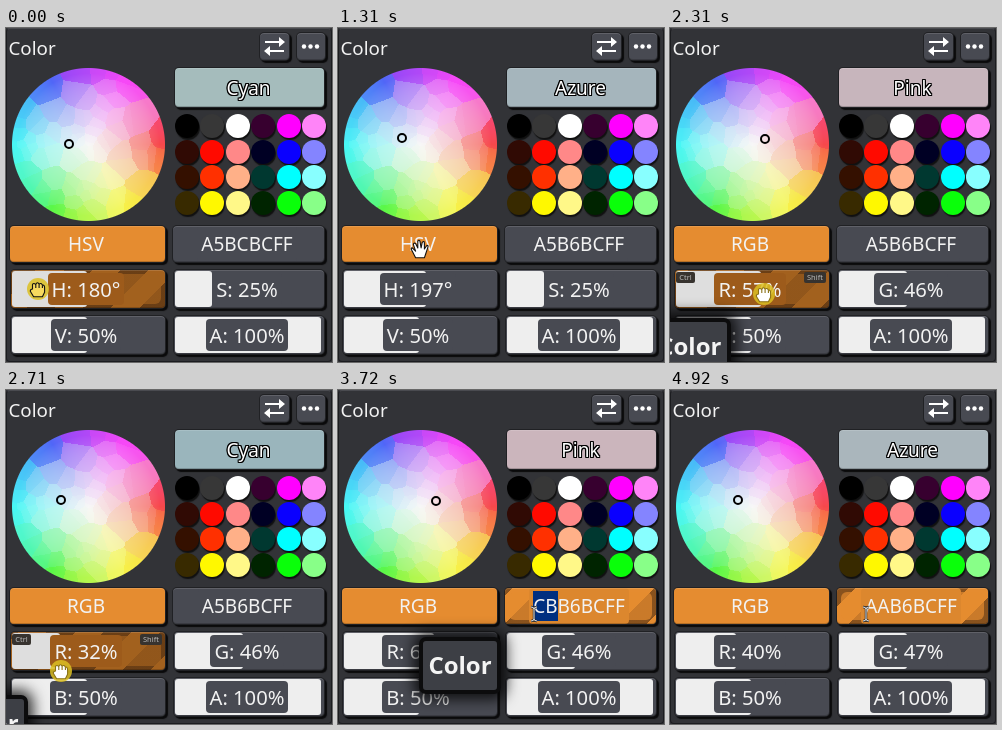
Recreate the animation shown at these times as an HTML page with a canvas. Size 326 by 334 pixels, loop 5020 ms.

```html
<!DOCTYPE html>
<html lang="en">
<head>
<meta charset="utf-8">
<title>Color panel</title>
<style>
html, body { margin: 0; width: 100%; height: 100%; overflow: hidden; background: #323337; }
#stage { position: relative; width: 326px; height: 334px; overflow: hidden; background: #323337;
  color: #f2f2f2; font: 20.2px "Noto Sans", "Open Sans", sans-serif; user-select: none; }
#stage > * { position: absolute; box-sizing: border-box; }
#edge { inset: 0; border: 1px solid #1b1c1f; border-top-color: #4a4b50; border-radius: 4px; }
#title { left: 2.5px; top: 5px; font-size: 18.8px; line-height: 30px; }
#wheel { left: 5px; top: 39px; }
#ring { width: 10px; height: 10px; margin: -5px; border: 2px solid #000; border-radius: 50%; }
.box { overflow: hidden; border-radius: 4px; background: #484a52; text-align: center; white-space: pre;
  box-shadow: 0 0 0 1px #202124, 2px 2px 1px 1px #0a0a0b; }
.box::after { content: ""; position: absolute; inset: 0; border-radius: 4px;
  box-shadow: inset 0 1px 0 rgba(255,255,255,.13), inset 0 -1px 0 rgba(0,0,0,.2); }
.field { font-size: 19px; font-weight: 300; }
.field .val { left: -1.5px; }
#mode { padding-right: 3px; }
.orange { background: #e58c30; }
.fill { position: absolute; left: 1px; top: 1px; bottom: 1px; border-radius: 3px; background: #eee; }
.stripes { position: absolute; inset: 0 -60px; display: none;
  background: repeating-linear-gradient(135deg, rgba(60,34,14,.55) 0 20px, transparent 20px 40px); }
.inner { position: absolute; inset: 4px; border-radius: 6px; display: none; opacity: .7; background: inherit; }
.hover { background: #e58c30; }
.hover .stripes, .hover .inner { display: block; }
.hover .fill { background: #d8d8d8; }
.val { position: relative; display: inline-block; padding: 0 4px; border-radius: 4px; background: #484a52; }
.slider .val { left: -2px; line-height: 32px; margin-top: 3px; }
.hover .val { background: #dc872e; }
.press { background: #a3611e; }
.press .fill { background: #dedede; }
.press .val { background: #9d5b1b; }
.sel { background: #002f80; display: inline-block; line-height: 30px; }
#swatch { left: 169px; top: 40px; width: 149px; height: 39px; line-height: 40px; padding-right: 2px;
  font-size: 19px; font-weight: 500; color: #fff;
  text-shadow: 1px 0 #000, -1px 0 #000, 0 1px #000, 0 -1px #000, 1px 1px #000, -1px 1px #000, 1px -1px #000, -1px -1px #000; }
.dot { width: 24px; height: 24px; border-radius: 50%; box-shadow: 1px 2px 1px #111; }
.key { height: 11px; border-radius: 2px; background: #37332f; color: #bbb; font-size: 7.5px; line-height: 11px; text-align: center; }
#tip { width: 82px; height: 57px; line-height: 48px; border: 4px solid #0c0c0d; border-radius: 7px; background: #3d3f45;
  color: #f4f4f4; font-size: 24px; font-weight: 600; text-align: center; box-shadow: 0 0 14px 5px rgba(0,0,0,.8); }
svg { overflow: visible; }
</style>
</head>
<body>
<div id="stage">
  <div id="edge"></div>
  <div id="title">Color</div>
  <div class="box" style="left:254px;top:5px;width:29px;height:27px"></div>
  <div class="box" style="left:291px;top:5px;width:28px;height:27px"></div>
  <svg width="326" height="40" fill="#fff">
    <path d="M259 13h14v-4l6 5-6 5v-4h-14zM278 22h-14v-4l-6 5 6 5v-4h14z"/>
    <circle cx="298" cy="18.500" r="2.200"/><circle cx="304.500" cy="18.500" r="2.200"/><circle cx="311" cy="18.500" r="2.200"/>
  </svg>
  <canvas id="wheel" width="155" height="155"></canvas>
  <div id="ring"></div>
  <div id="swatch" class="box"></div>
  <div id="mode" class="box field orange" style="left:4px;top:198px;width:155px;height:36px;line-height:36px"></div>
  <div id="hex" class="box field" style="left:167px;top:198px;width:151px;height:36px;line-height:36px"><div class="stripes"></div><div class="inner"></div><span class="val"></span></div>
  <div id="ctrl" class="key" style="left:6px;top:244px;width:19px">Ctrl</div>
  <div id="shift" class="key" style="left:134px;top:244px;width:22px">Shift</div>
  <div id="tip">Color</div>
  <svg id="hand" width="1" height="1">
    <circle id="glow" r="11" fill="#dcc022" fill-opacity=".85"/>
    <path id="palm" stroke="#111" stroke-linejoin="round" transform="scale(1.1)"/>
  </svg>
  <svg id="beam" width="1" height="1" fill="none">
    <path d="M-3-7q3 0 3 2V5q0 2-3 2M3-7q-3 0-3 2M0 5q0 2 3 2" stroke="#222" stroke-width="2.400"/>
    <path d="M-3-7q3 0 3 2V5q0 2-3 2M3-7q-3 0-3 2M0 5q0 2 3 2" stroke="#eee"/>
  </svg>
</div>
<script>
const $ = id => document.getElementById(id);
const stage = $('stage');
const LOOP = 5020, STEP = 100.4, LAST = 49;

const toByte = v => Math.round(255 * (v <= .0031308 ? v * 12.92 : 1.055 * v ** (1 / 2.4) - .055));
const toLinear = b => ((b / 255 + .055) / 1.055) ** 2.4;
const css = c => `rgb(${c.map(toByte)})`;
const percent = v => Math.round(v * 100) + '%';

function hsv(h, s, v) {
  return [5, 3, 1].map(n => {
    const k = (n + h / 60) % 6;
    return v - v * s * Math.max(0, Math.min(k, 4 - k, 1));
  });
}

function hueSat([r, g, b]) {
  const max = Math.max(r, g, b), d = max - Math.min(r, g, b);
  const h = !d ? 0 : max === r ? (g - b) / d : max === g ? 2 + (b - r) / d : 4 + (r - g) / d;
  return [(h * 60 + 360) % 360, d / max];
}

const NAMES = ['Red', 'Orange', 'Yellow', 'Lime', 'Green', 'Spring', 'Cyan', 'Azure', 'Blue', 'Violet', 'Magenta', 'Pink'];
const hueName = h => NAMES[Math.floor((h + 15) / 30) % 12];

// Faceted hue wheel: small cells near the middle, large ones at the rim
function drawWheel() {
  const ctx = $('wheel').getContext('2d'), size = 155, c = 77.5, R = 76.5;
  const img = ctx.createImageData(size, size);
  let seed = 11;
  const rnd = () => (seed = seed * 16807 % 2147483647) / 2147483647;
  const at = (x, y) => hsv((Math.atan2(y, x) * 180 / Math.PI + 360) % 360, Math.min(Math.hypot(x, y) / R, .93), .93).map(toByte);
  const cells = Array.from({ length: 90 }, () => {
    const r = R * rnd() ** .7, a = rnd() * 2 * Math.PI;
    const x = r * Math.cos(a), y = r * Math.sin(a);
    return { x, y, rgb: at(x, y) };
  });
  for (let j = 0; j < size; j++) for (let i = 0; i < size; i++) {
    const x = i + .5 - c, y = j + .5 - c, r = Math.hypot(x, y);
    if (r > R + .5) continue;
    let best = 1e9, cell;
    for (const p of cells) {
      const d = (p.x - x) ** 2 + (p.y - y) ** 2;
      if (d < best) { best = d; cell = p; }
    }
    const base = at(x, y), o = (j * size + i) * 4;
    for (let k = 0; k < 3; k++) img.data[o + k] = base[k] * .4 + cell.rgb[k] * .6;
    img.data[o + 3] = 255 * Math.min(1, R + .5 - r);
  }
  ctx.putImageData(img, 0, 0);
}

const PALETTE = [
  '#000 #373737 #fff #37002f #f0f #ff84f8',
  '#300a04 #ff0a00 #ff8888 #000024 #0a00ff #8484ff',
  '#341000 #ff3000 #ffb088 #003830 #0ff #88ffff',
  '#382a00 #fff800 #fff888 #002400 #0aff0a #88ff88'
];

function addDots() {
  PALETTE.forEach((row, j) => row.split(' ').forEach((color, i) => {
    const d = document.createElement('div');
    d.className = 'dot';
    d.style.cssText = `left:${168.5 + i * 25.5}px;top:${86 + j * 25.5}px;background:${color}`;
    stage.insertBefore(d, $('mode'));
  }));
}

function addSlider(x, y, w) {
  const el = document.createElement('div');
  el.className = 'box slider';
  el.style.cssText = `left:${x}px;top:${y}px;width:${w}px;height:38px`;
  el.innerHTML = '<div class="stripes"></div><div class="inner"></div><div class="fill"></div><span class="val"></span>';
  stage.insertBefore(el, $('ctrl'));
  return (label, v, text) => {
    el.querySelector('.fill').style.width = v * (w - 4) + 'px';
    el.querySelector('.val').textContent = label + ': ' + (text || percent(v));
    return el;
  };
}

// step, x, y of the pointer
const PATH = [
  [0, 32, 262], [7, 62.5, 276], [10, 90.5, 271], [13, 82, 222], [14, 82, 222],
  [18, 119, 256], [20, 119, 258], [27, 55, 282], [32, 119.5, 276], [34, 98.3, 268],
  [36, 196, 224], [50, 196, 224]
];

function pointer(n) {
  const i = PATH.findIndex((p, k) => n < PATH[k + 1][0]);
  const [a, x0, y0] = PATH[i], [b, x1, y1] = PATH[i + 1];
  const u = (n - a) / (b - a), e = u * u * (3 - 2 * u);
  return [x0 + (x1 - x0) * e, y0 + (y1 - y0) * e];
}

const OPEN = 'M-4 8 L-7 2 Q-9-1-7-1 L-4 2 L-6-4 Q-6-6-4-5 L-2-1 L-2-7 Q-1-9 0-7 L1-1 L2-6 Q4-8 4-5 L4 0 L6-3 Q8-4 7-1 L5 5 L4 8Z';
const FIST = 'M-4 7 L-7 2 Q-7 0-5 0 L-5-4 Q-4-6-2-4 Q-1-7 1-4.500 Q3-6 4-3.500 Q6-4 6-1 L6 3 L4 7Z M-2-4 V-1 M1-4.500 V-1 M4-3.500 V-1';

const place = (el, x, y) => { el.style.left = x + 'px'; el.style.top = y + 'px'; };
const show = (el, on) => { el.style.visibility = on ? 'visible' : 'hidden'; };

drawWheel();
addDots();
const s1 = addSlider(5, 242, 154), s2 = addSlider(168, 242, 150);
const s3 = addSlider(5, 288, 154), s4 = addSlider(168, 288, 150);
const stripes = document.querySelectorAll('.stripes');

function render(n) {
  const [x, y] = pointer(n), frac = (x - 4.5) / 157;
  const dragHue = n >= 1 && n <= 10, dragRed = n >= 20 && n <= 34;
  const press = n <= 10 || dragRed;
  const isHsv = n < 14;
  const hue = n < 1 ? 180 : dragHue ? frac * 360 : 197.3;

  let rgb = hsv(hue, .25, .5);
  if (dragRed) rgb[0] = frac;
  else if (n > 34) rgb[0] = toLinear(0xCB);
  if (n >= 44) rgb = [0xAA, 0xB6, 0xBC].map(toLinear);
  const [h, s] = hueSat(rgb);

  const a = h * Math.PI / 180;
  place($('ring'), 82 + 76 * s * Math.cos(a), 115.8 + 76 * s * Math.sin(a));
  $('swatch').style.backgroundColor = css(rgb);
  $('swatch').textContent = hueName(h);
  $('mode').textContent = isHsv ? 'HSV' : 'RGB';

  const first = isHsv ? s1('H', hue / 360, Math.round(hue) + '°') : s1('R', rgb[0]);
  if (isHsv) { s2('S', .25); s3('V', .5); }
  else { s2('G', rgb[1]); s3('B', rgb[2]); }
  s4('A', 1);

  const overFirst = n <= 10 || (n >= 17 && n <= 34), overHex = n >= 36;
  first.classList.toggle('hover', overFirst);
  first.classList.toggle('press', press);
  $('hex').classList.toggle('hover', overHex);
  stripes.forEach(el => el.style.transform = `translateX(${(n * 5.65) % 56.57}px)`);

  const typed = n < 41 ? 'CB' : n < 42 ? '' : n < 43 ? 'A' : 'AA';
  const head = n <= 10 ? 'A5BC' : n <= 34 ? 'A5B6' : typed + 'B6';
  const val = $('hex').querySelector('.val');
  const text = head + 'BCFF';
  if (n >= 37 && n < 41) val.innerHTML = `<span class="sel">${text.slice(0, 2)}</span>${text.slice(2)}`;
  else val.textContent = text;

  const keys = press && n > 0 && n !== 20;
  show($('ctrl'), keys);
  show($('shift'), keys);
  show($('tip'), n >= 23 && n <= 40);
  place($('tip'), x - 115, y + 23);

  show($('hand'), !overHex);
  show($('beam'), overHex);
  place($('hand'), x, y - 1);
  place($('beam'), x, y);
  $('glow').style.display = press ? '' : 'none';
  $('palm').setAttribute('d', press ? FIST : OPEN);
  $('palm').setAttribute('fill', n === 0 ? '#f7d95e' : '#fff');
  $('palm').setAttribute('stroke', press && n > 0 ? '#8a7216' : '#111');
}

let shown = -1;
const start = performance.now();
function tick() {
  const t = (performance.now() - start) % LOOP;
  const n = Math.min(LAST, Math.floor((t + 5) / STEP));
  if (n !== shown) render(shown = n);
  requestAnimationFrame(tick);
}
tick();
</script>
</body>
</html>
```
